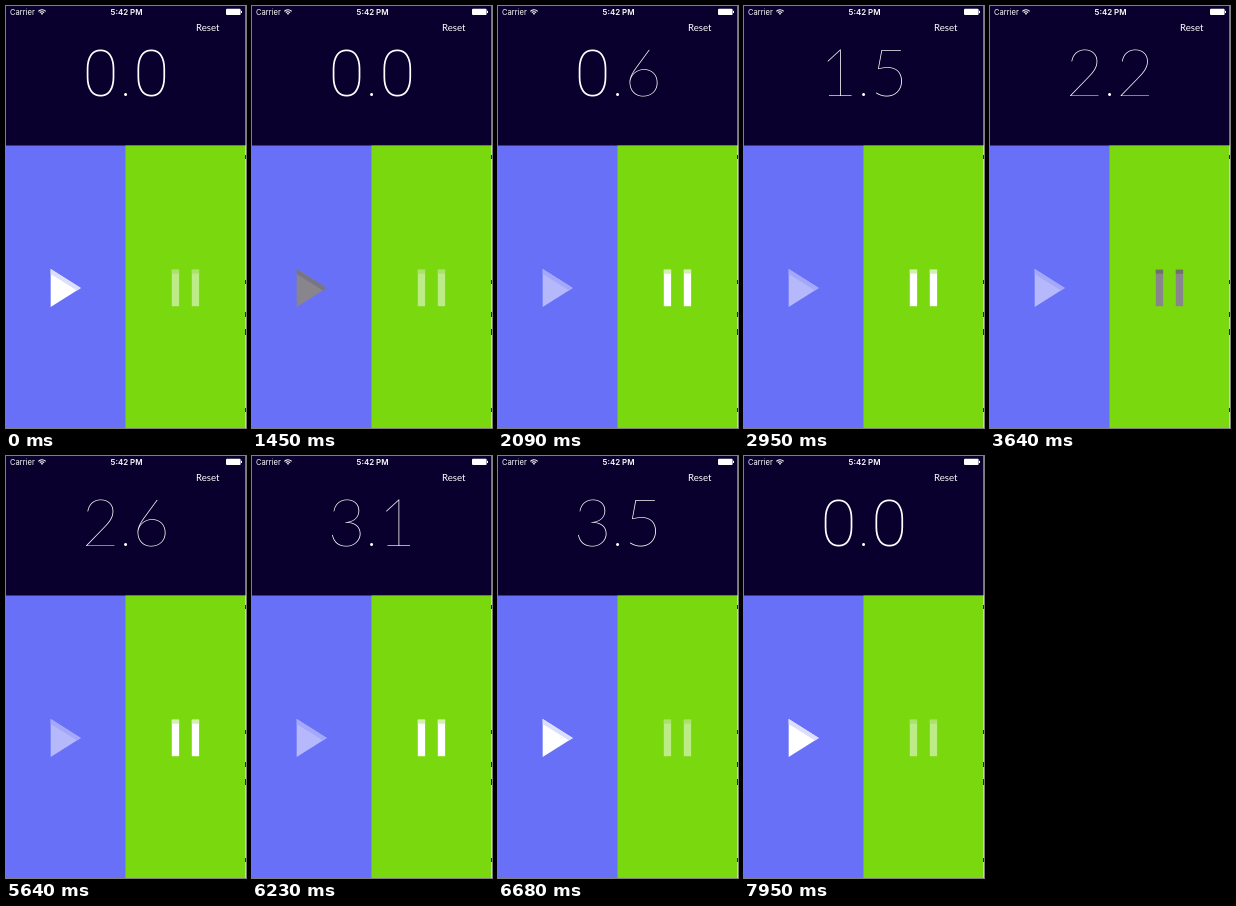
These frames come from a looping animation (240 by 422 pixels, 8000 ms). An HTML page with a canvas:

```html
<!DOCTYPE html>
<html lang="en">
<head>
<meta charset="utf-8">
<title>Stopwatch</title>
<style>
html, body { margin: 0; width: 100%; height: 100%; overflow: hidden; background: #0a002d; }
canvas { display: block; width: 240px; height: 422px; }
</style>
</head>
<body>
<canvas id="stage"></canvas>
<script>
const LOOP = 8000;
const canvas = document.getElementById('stage');
const ctx = canvas.getContext('2d');
const dpr = window.devicePixelRatio || 1;
canvas.width = 240 * dpr;
canvas.height = 422 * dpr;

const NAVY = '#0a002d', BLUE = '#6870f8', GREEN = '#7ad80e';
const DIGIT = '200 65px Lato, sans-serif';
const ZERO = '140 65px Roboto, sans-serif'; // narrower oval
const POINT = '100 46px Lato, sans-serif';

// Each button has a face colour and a shaded upper edge.
const PLAY = {
  on: ['#ffffff', '#dcdefe'],
  off: ['#b5b8fb', '#a4a8fa'],
  down: ['#88858d', '#777681']
};
const PAUSE = {
  on: ['#ffffff', '#d3f1ae'],
  off: ['#bdeb87', '#a9e36b'],
  down: ['#89858c', '#6d7467']
};

// start/end: clock limits; press/release: visible state of each button
const RUNS = [
  { start: 1440, end: 3740, from: 0, press: 1370, release: 1490, stop: 3600, stopped: 3735 },
  { start: 5340, end: 6610, from: 2.3, press: 5290, release: 5405, stop: 6490, stopped: 6610 }
];
const RESET_AT = 7860;

function stateAt(t) {
  const s = { value: 0, play: 'on', pause: 'off' };
  for (const r of RUNS) {
    if (t >= r.start) {
      const ticks = Math.floor((Math.min(t, r.end) - r.start) / 100);
      s.value = r.from + ticks / 10;
    }
    if (t >= r.press && t < r.release) s.play = 'down';
    if (t >= r.release && t < r.stopped) {
      s.play = 'off';
      s.pause = t >= r.stop ? 'down' : 'on';
    }
  }
  if (t >= RESET_AT) s.value = 0;
  return s;
}

function rect(x, y, w, h, color) {
  ctx.fillStyle = color;
  ctx.fillRect(x, y, w, h);
}

function poly(color, points) {
  ctx.fillStyle = color;
  ctx.beginPath();
  points.forEach(([x, y]) => ctx.lineTo(x, y));
  ctx.closePath();
  ctx.fill();
}

function label(text, x, y, font, align = 'left') {
  ctx.font = font;
  ctx.textAlign = align;
  ctx.fillStyle = '#fff';
  ctx.fillText(text, x, y);
}

function clock(value) {
  const [whole, tenth] = value.toFixed(1).split('.');
  const digit = (d, x) => label(d, x, 90, d === '0' ? ZERO : DIGIT, 'center');
  digit(whole, 94.5);
  label('.', 119.6, 90, POINT, 'center');
  digit(tenth, 145.2);
}

function wifi(x, y) {
  ctx.strokeStyle = '#fff';
  ctx.lineWidth = 1.1;
  for (const r of [3, 5]) {
    ctx.beginPath();
    ctx.arc(x, y, r, -Math.PI * 0.76, -Math.PI * 0.24);
    ctx.stroke();
  }
  ctx.fillStyle = '#fff';
  ctx.beginPath();
  ctx.moveTo(x, y);
  ctx.arc(x, y, 1.6, -Math.PI * 0.78, -Math.PI * 0.22);
  ctx.fill();
}

function battery() {
  ctx.fillStyle = '#fff';
  ctx.beginPath();
  ctx.roundRect(220, 2.8, 14.6, 6.1, 1);
  ctx.fill();
  rect(235, 4.8, 1, 2.2, '#fff');
}

function playButton([face, edge]) {
  poly(face, [[44.7, 263], [74.8, 282], [44.7, 301]]);
  poly(edge, [[44.7, 263], [74.8, 282], [71, 284.4], [44.7, 268]]);
}

function pauseButton([face, edge]) {
  for (const x of [165.8, 185.8]) {
    rect(x, 263.7, 7.3, 36.5, face);
    rect(x, 263.7, 7.3, 4, edge);
  }
}

function draw(t) {
  const s = stateAt(t);
  ctx.setTransform(dpr, 0, 0, dpr, 0, 0);
  rect(0, 0, 240, 422, NAVY);
  rect(0, 139.5, 240, 283, BLUE);
  rect(119.5, 139.5, 121, 283, GREEN);

  label('Carrier', 4, 8.8, '7.6px Inter, sans-serif');
  wifi(36, 8.8);
  label('5:42 PM', 120.5, 8.8, '600 7.9px Inter, sans-serif', 'center');
  battery();
  label('Reset', 190, 25.2, '9.6px Lato, sans-serif');
  clock(s.value);

  playButton(PLAY[s.play]);
  pauseButton(PAUSE[s.pause]);

  // Sliver of the page behind the right edge
  rect(239, 0, 1, 422, 'rgba(255,255,255,0.45)');
  for (const [y, h] of [[149, 4], [274, 4], [306, 5], [323, 6], [402, 4]]) {
    rect(239, y, 1, h, '#1c3a08');
  }
}

function frame(now) {
  draw(now % LOOP);
  requestAnimationFrame(frame);
}
requestAnimationFrame(frame);
</script>
</body>
</html>
```
